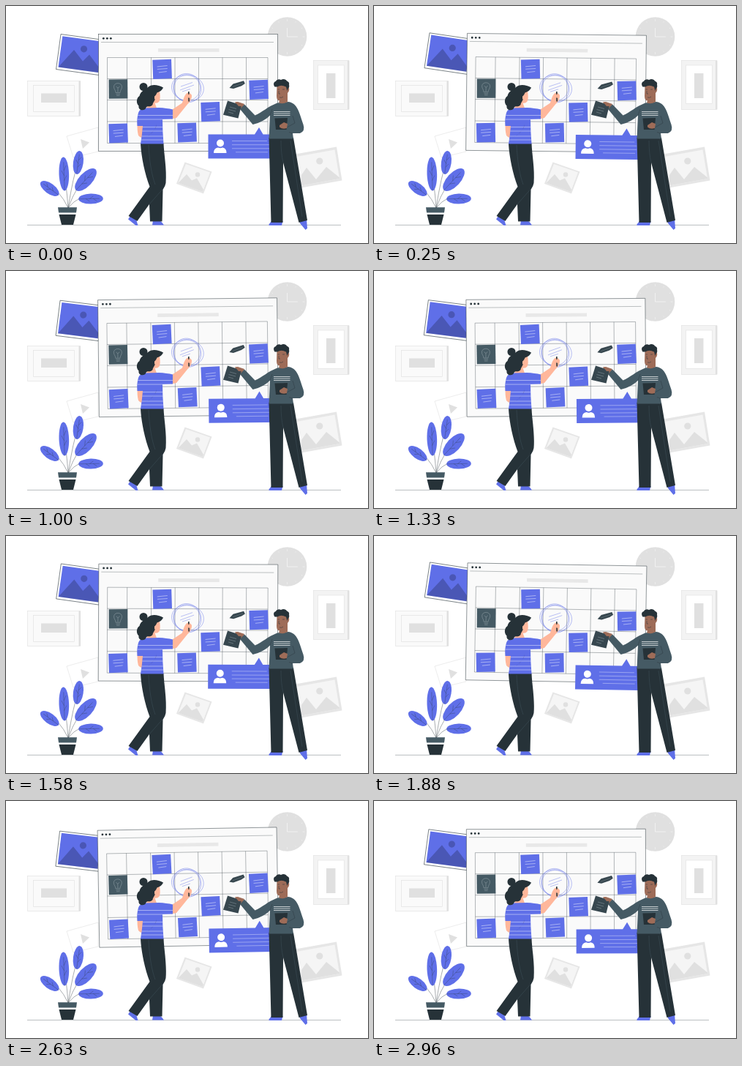
Recreate the animation shown at these times as an HTML page. Size 495 px wide and 324 px high, loop 3 s.

```html
<!DOCTYPE html>
<html lang="en">
<head>
<meta charset="utf-8">
<title>Planning board</title>
<style>
html, body { margin: 0; width: 100%; height: 100%; overflow: hidden; background: #fff; }
svg { display: block; width: 495px; height: 324px; }
.blue { fill: #5f6fe8; }
.dark { fill: #263238; }
.slate { fill: #455a64; }
.skin { fill: #ffb79b; }
.brown { fill: #9e6c58; }
.gray { fill: #e0e0e0; }
.pale { fill: #f5f5f5; }
.line { fill: none; stroke: #263238; stroke-width: .4; }
.thin { fill: none; stroke: #fff; stroke-width: .45; }
.seam { fill: none; stroke: #455a64; stroke-width: .4; }
.ink { fill: none; stroke: #5f6fe8; stroke-width: .42; }
.edge { fill: #fafafa; stroke: #e0e0e0; stroke-width: .6; }
</style>
</head>
<body>
<svg viewBox="0 0 495 324">
  <defs>
    <path id="top" d="M190 139.500Q183 140 181 146Q178.500 154 179.500 164L187 164Q186 177 184 188.500H215.500Q214 172 214 155L228 154.500V141.500Q220 139.500 209 139Z"/>
    <clipPath id="topClip"><use href="#top"/></clipPath>
  </defs>

  <g id="wall">
    <circle class="gray" cx="384.500" cy="42" r="26.800"/>
    <g id="ticks" stroke="#f3f3f3" stroke-width=".6"/>
    <path d="M384.500 30V42H399" fill="none" stroke="#f7f7f7" stroke-width=".7"/>

    <rect class="edge" x="29.500" y="102.500" width="72" height="48"/>
    <path class="gray" d="M99.500 102.500h2.500v48h-2.500z"/>
    <rect class="edge" x="37.500" y="108.500" width="56" height="36" fill="#fff"/>
    <path class="gray" d="M48 119.500h35v12.500h-35z"/>

    <rect class="edge" x="420.500" y="74.500" width="48" height="67" style="fill:#f3f3f3"/>
    <path class="gray" d="M467 74.500h2.500v67h-2.500z"/>
    <rect class="edge" x="426.500" y="81" width="36" height="52.500" style="fill:#fff"/>
    <path class="gray" d="M438 92h12.500v34h-12.500z"/>

    <path class="edge" style="fill:#fff" d="M83 178L126 166V199L92 207Z"/>
    <path class="gray" d="M102 182L114 186.500L105 195Z"/>

    <path fill="#e6e6e6" d="M393 203L452 192.500L459.500 238.500L401 249Z"/>
    <path class="pale" d="M397 206L449.500 196.500L456 236L403 245.500Z"/>
    <path class="gray" d="M403 245L404 231L411 221L424 237L438 220L456 234.500V236L403 245.500Z"/>
    <circle class="gray" cx="428.800" cy="212" r="4.600"/>

    <path fill="#e6e6e6" d="M244.500 213.500L281.500 226.500L270 256.500L233 243Z"/>
    <path class="pale" d="M246 216L279 227.500L269 254L235.500 242Z"/>
    <path class="gray" d="M235.500 242L247 230L254 238.500L261 235.500L270 251L269 254Z"/>
    <circle class="gray" cx="262" cy="230.500" r="3.200"/>
  </g>

  <path d="M29 299.500H458" stroke="#a0a5a8" stroke-width=".7"/>

  <g id="board">
    <path class="line" style="fill:#fff;stroke-width:.6" d="M75 38.500L134 46.500L127 94.500L68.500 86.500Z"/>
    <path class="blue" d="M77.300 41.200L131 48.500L126 91L71.500 83.600Z"/>
    <g fill="#000" fill-opacity=".22">
      <path d="M71.500 83.600L93 60L105 75.500L114 66.500L127 84V91Z"/>
      <circle cx="106.500" cy="58.800" r="4.600"/>
    </g>
    <rect class="line" style="fill:#fafafa;stroke-width:.5" x="126.500" y="38.500" width="245" height="160"/>
    <path class="line" stroke-opacity=".75" d="M130 49.500H366"/>
    <g class="dark">
      <circle cx="133.300" cy="44.300" r="1.400"/><circle cx="138.300" cy="44.300" r="1.400"/><circle cx="143.300" cy="44.300" r="1.400"/>
    </g>
    <path fill="#e8e8e8" d="M208 58h83.500v4.700h-83.500z"/>
    <path class="line" stroke-opacity=".85" d="M138.500 70.500H358V187.500H138.500ZM138.500 99.500H358M138.500 128.500H358M138.500 158H358M165.500 70.500V187.500M198.500 70.500V187.500M231 70.500V187.500M263.500 70.500V187.500M296 70.500V187.500M328.500 70.500V187.500"/>
    <g id="notes"/>
    <path fill="none" stroke="#aebbc1" stroke-width=".4" d="M150 118.500C150 115 147.500 114 147.500 110.500C147.500 104 158.500 104 158.500 110.500C158.500 114 156 115 156 118.500ZM150.500 120.500H156M151 122.500H155.500M153 118V112L150.500 110M153 112L155.500 110"/>
    <g class="ink">
      <ellipse cx="247.500" cy="112" rx="18" ry="17.500"/>
      <ellipse cx="248.500" cy="112" rx="22" ry="18" transform="rotate(10 248.500 112)"/>
      <ellipse cx="248" cy="112" rx="18.500" ry="20" transform="rotate(-30 248 112)"/>
      <path d="M239 110L255 104.500M238 115L257 108M241 117L252 113.500"/>
    </g>
    <path fill="#37474f" d="M305.500 112L310.500 106.500L325 102.300L326.800 106L322 109.200L311 113Z"/>
    <path class="seam" style="stroke:#8b989e" d="M310 110.500L324 105.500"/>
    <path class="blue" d="M276.500 175.500H340L346 166L351.500 175.500H378V208.500H276.500Z"/>
    <circle cx="293" cy="187.500" r="5" fill="#fff"/>
    <path fill="#fff" d="M284 201Q284 194 290 193.500Q293 195 296 193.500Q301.500 194 301.500 201Z"/>
    <path class="thin" stroke-opacity=".8" d="M309 184.500H357M309 189.700H360M309 194.800H360M314 199.800H358"/>
  </g>

  <g id="plant">
    <g id="leaves"/>
    <path class="slate" d="M71 275.300h26l-1 7.200h-24z"/>
    <path class="dark" d="M72.500 285H95.500L92 299H76Z"/>
  </g>

  <g id="woman">
    <path class="blue" d="M170 287L167 291.500L177.500 300H180.500L178 292ZM201 293L200 299.500H216Q214 296 211 294Z"/>
    <path class="dark" d="M184 188H215.500C216 203 220 222 218.500 242Q218 246 214.500 251L213.500 294.500H197L196 271L179.500 294L167.500 287L196.500 247C190 230 185 207 184 188Z"/>
    <path class="seam" d="M195 190C196 211 199 231 204 244M214.500 250L196 271"/>
    <path class="skin" d="M179.800 160L188 162L188.500 179Q185 182 181 177Q179 170 179.800 160ZM226 142.500L241 132.500C243 126 245 119 249 118.500Q254 119 254 124Q253 130 248 134.500L233 153L226 154.500Z"/>
    <path class="dark" d="M249 117H250.600L251 130.500H249.400Z"/>
    <path class="skin" d="M247 122Q251 119 254 122L252 126L248 125Z"/>
    <path class="skin" d="M199 116L210 115C210.500 121 211.500 127 209.500 130.500Q207 133.500 203.500 132.500L206 139.500Q199 143 192 139.500L196 130Z"/>
    <use class="blue" href="#top"/>
    <g clip-path="url(#topClip)">
      <path d="M206 160Q204 174 189 180Q198 177 205 166Z" opacity=".3"/>
      <path class="thin" d="M178 149.500H229M178 155H229M178 165.500H216M178 171H216M178 178H216M178 183H216"/>
    </g>
    <circle class="dark" cx="188" cy="110.500" r="5.500"/>
    <path class="dark" d="M215 111.500C213 116 210 117 206.500 118.500Q205.500 121 204 123C205 129 201 131 200.500 135C197 139.500 193.500 135.500 191.500 139C190 144 180.500 143.500 181.500 136.500C177 132 179 125 182.500 123C184 116 190 115 193.500 111.500C199 106 208 107.500 215 111.500Z"/>
    <path class="skin" d="M203 123.500Q206 121 207 125Q206 129 203 127Z"/>
  </g>

  <g id="man">
    <path class="blue" d="M363 294L359.500 298.500V300H377L378.500 294ZM401 293L411 291L412 304L409.500 306L402 297Z"/>
    <path class="dark" d="M359.500 180H393L412 293L400.500 296L379 214L378.500 296H362.500Z"/>
    <path class="seam" d="M376 184Q376 202 379 214M389 184L405 288"/>
    <path class="brown" d="M326 134L317 131Q312 131 314 134L318 140L322 142Z"/>
    <path class="slate" d="M371 132.500C357 138 351 145 340.500 149.500L326 134.500L320 141L337.500 162C347 160 356 155 361 149.500L359.500 181.500H393L392 174H402Q409.500 171 406.500 162C403 152 401 143 396 136.500Q392 131.500 386 131Z"/>
    <path class="seam" style="stroke:#263238" d="M361 149.500L364 141M392 150L395 160L384 166M392 174L387 172.500"/>
    <path class="thin" style="stroke-width:.7" d="M366 144.500H388.500M366 147H388.500M366 149.500H388.500"/>
    <path class="brown" d="M370.500 109Q377 105 385 110Q388.500 112 386.500 117L385 119V131Q378 135 373 132L374 129.500Q370 129 370 123Z"/>
    <path class="dark" d="M367.500 110.500C365 107 366 103.500 369 103C370 100 374 99.500 376 101C379 99 383 100 384 102.500Q388 104 387 107.500Q388 111 385.500 113L384.500 116L383 110.500Q376 107 371 110.500Z"/>
    <path d="M371.500 114H374M378 114H381M373 116V120H375M374 125Q377 126 379 124" fill="none" stroke="#263238" stroke-width=".5"/>
    <path class="dark" d="M367.500 153.500L385 153L383.500 169H369Z"/>
    <path class="brown" d="M374 163L380 159L385 161L384 167Q378 169 374 165.500Z"/>
    <path fill="#37474f" d="M303 129.500L322 135.500L317.500 153.500L297 148.800Z"/>
    <path d="M306 138L315 140.500M304.500 141.500L314 144M304 145L311 147" stroke="#9aa8ae" stroke-width=".45"/>
    <path class="brown" d="M313 131L321 133L323 137L318 137Z"/>
  </g>
</svg>
<script>
const el = id => document.getElementById(id);
const fill = (id, items, draw) => el(id).innerHTML = items.map(draw).join('');

fill('ticks', [...Array(12).keys()], i =>
  `<path d="M384.5 18v${i % 3 ? 1.5 : 3}" transform="rotate(${i * 30} 384.5 42)"/>`);

// left, top, fill class, has writing
fill('notes', [
  [200.3, 73.7, 'blue', 1], [140.5, 100.5, 'slate', 0], [332.3, 101.7, 'blue', 1],
  [266.3, 132, 'blue', 1], [140.3, 161.3, 'blue', 1], [234.3, 160.3, 'blue', 1]
], ([x, y, tone, text]) => `<g transform="translate(${x} ${y}) rotate(${text ? -2 : -.5})">
  <rect class="${tone}" width="25.7" height="26.2"/>
  ${text ? '<path class="thin" d="M6 9.500L20 8.500M6 13L20 12.500M8 17.500L19 16.500"/>' : ''}</g>`);

// centre x, centre y, half width, half length, tilt
fill('leaves', [
  [79.3, 229.5, 6.8, 23, -2], [98.8, 214, 6.9, 16, 8], [109, 237.5, 9, 19.5, 43],
  [116, 263.5, 7, 16.8, 89], [59.7, 249.5, 7, 15, -54]
], ([x, y, w, h, tilt]) => `<path class="line" d="M${x} ${y}Q${(x + 85) / 2} ${(y + 250) / 2} 85 276"/>
  <g transform="translate(${x} ${y}) rotate(${tilt})">
    <ellipse class="blue" rx="${w}" ry="${h}"/>
    <path class="line" stroke-opacity=".7" d="M0 ${h}V${-h * .7}M0 ${h * .4}L${w * .5} ${h * .1}M0 ${h * .1}L${-w * .5} ${-h * .2}M0 ${-h * .2}L${w * .5} ${-h * .5}"/>
  </g>`);

// Triangle wave: 0, 1, 0, -1 degrees over 1.5 s, stepped at 24 per second
const start = performance.now();
function frame(now) {
  const t = Math.max(0, now - start) % 3000;
  const phase = Math.floor((t + 5) * 24 / 1000) / 36;
  const angle = 2 / Math.PI * Math.asin(Math.sin(phase * 2 * Math.PI));
  el('board').setAttribute('transform', `rotate(${angle} 223 123)`);
  requestAnimationFrame(frame);
}
frame(start);
</script>
</body>
</html>
```
